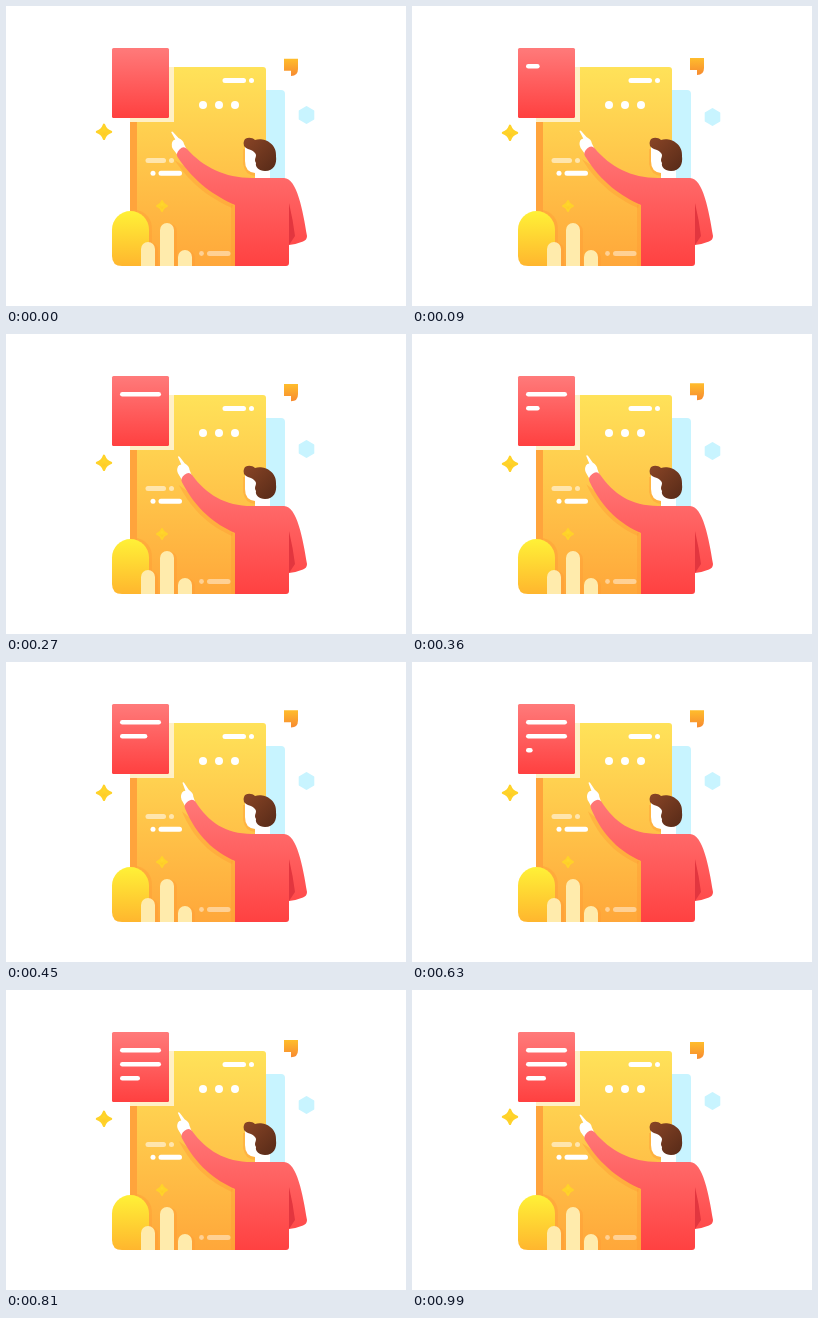
These frames come from a looping animation (400 px wide and 300 px high, 1.08 s). An HTML page:

```html
<!DOCTYPE html>
<html lang="en">
<head>
<meta charset="utf-8">
<title>Presenter</title>
<style>
  html, body { margin: 0; width: 100%; height: 100%; overflow: hidden; background: #fff; }
  svg { display: block; width: 100%; height: 100%; }
  .ink { stroke: #fff; stroke-width: 5; stroke-linecap: round; fill: none; }
  .shade { fill: #ff9a34; opacity: .4; }
</style>
</head>
<body>
<svg viewBox="0 0 400 300">
  <defs>
    <linearGradient id="panel" x2="0" y2="1"><stop stop-color="#ffe259"/><stop offset="1" stop-color="#ffa73a"/></linearGradient>
    <linearGradient id="red" x2="0" y2="1"><stop stop-color="#ff7a7a"/><stop offset="1" stop-color="#ff4040"/></linearGradient>
    <linearGradient id="shirt" gradientUnits="userSpaceOnUse" x1="0" y1="138" x2="0" y2="260"><stop stop-color="#ff7878"/><stop offset="1" stop-color="#ff4141"/></linearGradient>
    <linearGradient id="dome" x2="0" y2="1"><stop stop-color="#fff137"/><stop offset="1" stop-color="#ffb62e"/></linearGradient>
    <linearGradient id="gold" x2="0" y2="1"><stop stop-color="#ffe42f"/><stop offset="1" stop-color="#ffbf26"/></linearGradient>
    <linearGradient id="amber" x2="0" y2="1"><stop stop-color="#ffbd2c"/><stop offset="1" stop-color="#f78a30"/></linearGradient>
    <linearGradient id="hair" x2="1" y2="1"><stop stop-color="#8a4526"/><stop offset="1" stop-color="#562a18"/></linearGradient>
    <path id="spark" d="M0-7Q1.8-1.8 7 0Q1.8 1.8 0 7Q-1.8 1.8-7 0Q-1.8-1.8 0-7Z" fill="url(#gold)" stroke="#ffd229" stroke-width="2.4" stroke-linejoin="round"/>
    <clipPath id="floor"><rect width="400" height="260"/></clipPath>
  </defs>

  <path d="M255 84H275Q279 84 279 88V200H255Z" fill="#c8f4ff"/>
  <rect x="124" y="100" width="10" height="160" fill="#ffa43c"/>
  <path d="M131 61H257Q260 61 260 64V260H131Z" fill="url(#panel)"/>
  <path d="M124 61H168V116H124Z" fill="#fff0c6"/>
  <rect x="106" y="42" width="57" height="70" rx="1.5" fill="url(#red)"/>
  <g id="lines" class="ink" style="stroke-width:4.6"></g>

  <g fill="#fff">
    <circle cx="197" cy="99" r="4"/><circle cx="213" cy="99" r="4"/><circle cx="229" cy="99" r="4"/>
    <circle cx="245.5" cy="74.5" r="2.5"/><circle cx="147" cy="167.3" r="2.5"/>
    <circle cx="165.5" cy="154.5" r="2.5" opacity=".55"/><circle cx="195.5" cy="247.5" r="2.4" opacity=".45"/>
  </g>
  <g class="ink">
    <path d="M219 74.5H237.500M155 167.300H173.500"/>
    <path d="M142 154.500H157.500" opacity=".55"/>
    <path d="M203.500 247.500H222" opacity=".45"/>
  </g>

  <g clip-path="url(#floor)">
    <path class="shade" d="M131 204Q146 208 146 224V260H131Z"/>
    <path d="M106 223.500A18.500 18.500 0 0 1 143 223.500V260H116Q106 260 106 250Z" fill="url(#dome)"/>
    <g id="bars"></g>
  </g>
  <use href="#spark" transform="translate(156 200) scale(.74)"/>

  <g clip-path="url(#floor)">
    <path id="armShade" class="shade" transform="translate(-3 3)"/>
    <rect class="shade" x="225" y="199" width="5" height="61"/>
  </g>
  <path class="shade" d="M237 143V158Q239 169 249 170V143Z"/>
  <path d="M239 138H262V172H249V167Q239 166 239 155Z" fill="#fff"/>
  <rect x="249" y="155" width="15" height="19" fill="#fff"/>
  <path d="M238 135C239 131 246 131 249 134C256 131 271 136 270 150C271 158 268 165 259 165C253 165 249 161 250 157C247 153 252 150 249 147C246 143 241 144 238 140Q237 137 238 135Z" fill="url(#hair)"/>

  <g id="hand" fill="#fff">
    <path d="M165.200 126.200Q166 125 167.200 126.300L172.500 132Q177.500 134.500 178 138L181 144L173 151L168.500 145Q164.500 141 166.200 136Q167.200 133.800 169.300 133.500Z"/>
  </g>
  <path id="body" fill="url(#shirt)"/>
  <path d="M283 197Q287 214 289 230L283 239Z" fill="#e2363f"/>

  <path id="quote" d="M278 52.800H292V63Q292 70 285 70V64.800H278Z" fill="url(#amber)"/>
  <use id="star" href="#spark"/>
  <path id="hex" d="M0-8L6.800-4V4L0 8L-6.800 4V-4Z" fill="#c8f4ff" stroke="#c8f4ff" stroke-width="2" stroke-linejoin="round"/>
</svg>
<script>
  const LOOP = 1080, STEP = 90, PIVOT = [206, 197];
  const $ = id => document.getElementById(id);
  const put = (id, name, value) => $(id).setAttribute(name, value);

  $('bars').innerHTML = [[135, 236], [154, 217], [172, 244]].map(([x, y]) =>
    `<rect class="shade" x="${x + 3}" y="${y + 1}" width="14" height="50" rx="7"/>
     <rect x="${x}" y="${y}" width="14" height="60" rx="7" fill="#ffebac"/>`).join('');

  // y, full width, start time, writing time
  const lines = [[60.3, 41, 0, 270], [74.2, 27, 270, 180], [88.2, 20, 540, 270]];
  lines[1] = [74.2, 41, 270, 270];

  function turn(x, y, deg) {
    const a = deg * Math.PI / 180, dx = x - PIVOT[0], dy = y - PIVOT[1];
    const c = Math.cos(a), s = Math.sin(a);
    return `${(PIVOT[0] + dx * c - dy * s).toFixed(2)} ${(PIVOT[1] + dx * s + dy * c).toFixed(2)}`;
  }

  function draw(time) {
    const t = Math.floor(time % LOOP / STEP) * STEP;
    const swing = 1 - Math.abs(t / (LOOP / 2) - 1);
    const deg = 10.5 * swing;

    $('lines').innerHTML = lines.map(([y, width, start, span]) => {
      const w = width * Math.min(1, Math.max(0, (t - start) / span));
      return w ? `<path d="M116.300 ${y}H${114 + Math.max(w - 2.3, 2.4)}"/>` : '';
    }).join('');

    const low = `${turn(189, 177, deg * .7)} 209 190 229 199`;
    const cuff = `Q${turn(169.5, 147.5, deg)} ${turn(173.5, 143.5, deg)}Q${turn(177.5, 139.5, deg)} ${turn(181, 143, deg)}`;
    const top = `C${turn(197, 161, deg)} 219 172 246 172`;
    const arm = `C209 190 ${turn(189, 177, deg * .7)} ${turn(171.5, 151, deg)}${cuff}${top}`;
    put('body', 'd', `M229 260V199${arm}H278C291 172 297 205 301 230Q301 234 297 235.500Q291 238 283 239V257Q283 260 280 260Z`);
    put('armShade', 'd', `M${turn(171.5, 151, deg)}C${low}L232 190Z`);
    put('hand', 'transform', `rotate(${deg} ${PIVOT})`);

    put('quote', 'transform', `translate(0 ${-5.5 * swing})`);
    put('star', 'transform', `translate(98 ${125.8 + 6 * swing})`);
    put('hex', 'transform', `translate(300.500 ${109 + 12 * swing})`);
  }

  const begin = performance.now();
  function tick() {
    draw(performance.now() - begin);
    requestAnimationFrame(tick);
  }
  draw(0);
  requestAnimationFrame(tick);
</script>
</body>
</html>
```
